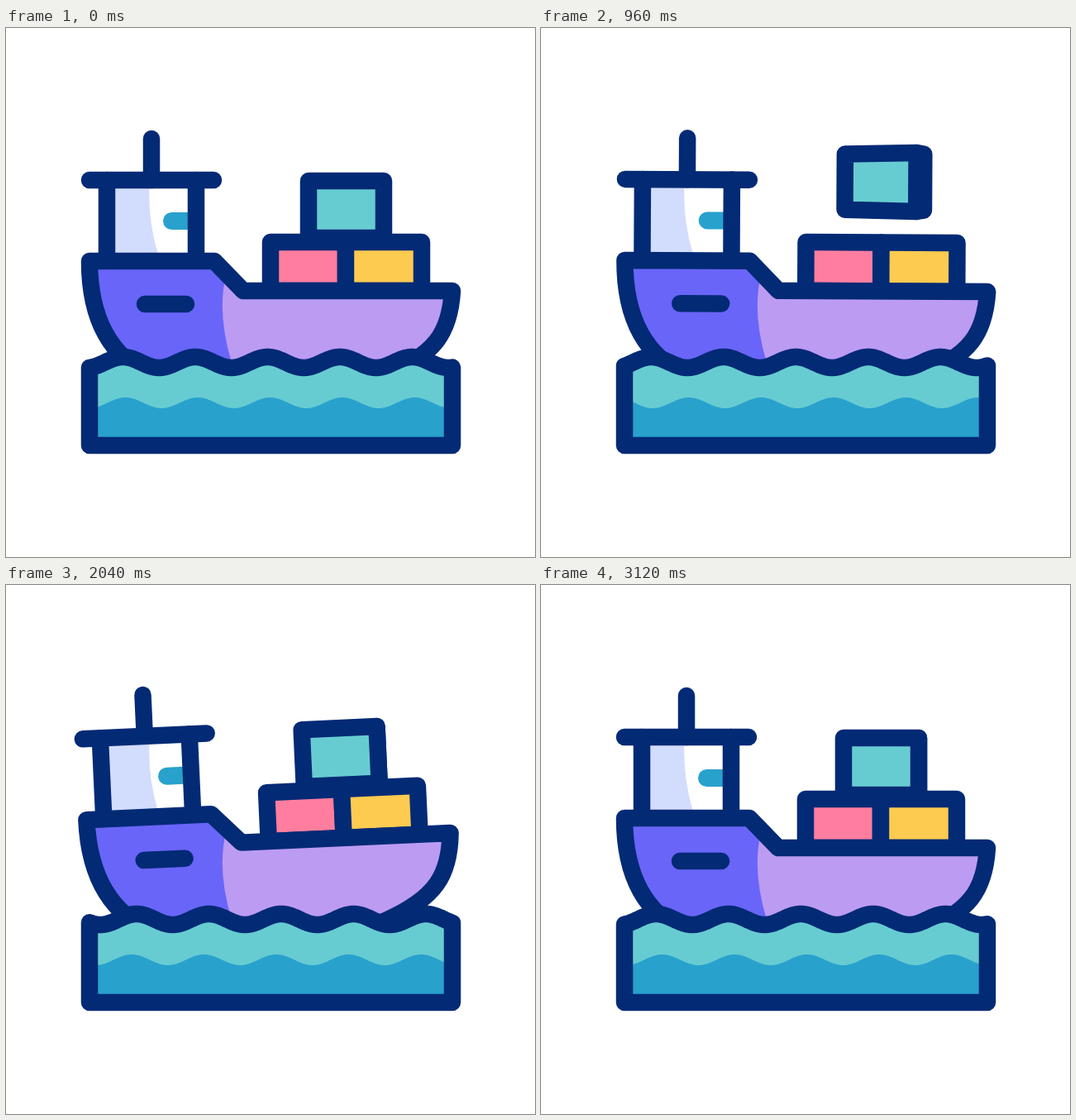
Recreate the animation shown at these times as an HTML page with a canvas. Size 640x640 px, loop 3160 ms.

```html
<!DOCTYPE html>
<html>
<head>
<meta charset="utf-8">
<style>
html, body { margin: 0; width: 100%; height: 100%; overflow: hidden; background: #fff; }
canvas { display: block; width: 640px; height: 640px; }
</style>
</head>
<body>
<canvas id="stage" width="640" height="640"></canvas>
<script>
const LOOP = 3160, STEP = 40, WAVE = 87.5;
const NAVY = '#032a75', TEAL = '#67ccd1', BLUE = '#28a1cd', PURPLE = '#6965f8',
  LAVENDER = '#bc9bf3', PALE = '#d2dcfd', PINK = '#ff7e9f', YELLOW = '#fecb51', ORANGE = '#ff9100';
const c = document.getElementById('stage').getContext('2d');

const rad = a => a * Math.PI / 180;
const mix = (a, b, k) => a + (b - a) * k;
const clamp = v => Math.min(1, Math.max(0, v));

// Soft rise from 0 to 1 and back between two times
const bump = (t, from, to) => Math.sin(Math.PI * clamp((t - from) / (to - from))) ** 2;

// The ship rocks in alternating swings
const tilt = t => 2.9 * bump(t, 260, 1040) - 5 * bump(t, 960, 1360)
  + 2.4 * bump(t, 1320, 1640) - 2.95 * bump(t, 1640, 2300) + .8 * bump(t, 2300, 3000);

// A heave lifts the hull and disturbs both waves
const heave = t => bump(t, 1400, 2360);
const swell = t => 2 * WAVE * t / LOOP + 30 * bump(t, 560, 1600)
  - 12 * heave(t) + 5 * bump(t, 2200, 3080);
const drift = t => 44 * heave(t) - 2 * WAVE * t / LOOP;

function poly(points, fill) {
  const p = new Path2D();
  points.forEach(([x, y]) => p.lineTo(x, y));
  p.closePath();
  c.fillStyle = fill;
  c.fill(p);
  c.stroke(p);
}

function line(x1, y1, x2, y2) {
  c.beginPath();
  c.moveTo(x1, y1);
  c.lineTo(x2, y2);
  c.stroke();
}

const crate = (x, y, w, h, fill) =>
  poly([[x, y], [x + w, y], [x + w, y + h], [x, y + h]], fill);

const hull = new Path2D(`M101 282H252L287 318H540C537 368 520 396 455 421L440 425H200
  L178 422C120 396 101 342 101 282Z`);
const cabin = new Path2D('M122 184H230V282H122Z');
const hullShade = new Path2D('M0 200H270L266 300Q255 345 273 405L280 450H0Z');
const cabinShade = new Path2D('M0 150H178Q166 215 184 274L190 300H0Z');

// Fills a moving shape; its shade stays fixed to the stage
function shaded(shape, base, shade, tint) {
  c.save();
  c.clip(shape);
  c.resetTransform();
  c.fillStyle = base;
  c.fillRect(0, 0, 640, 640);
  c.fillStyle = tint;
  c.fill(shade);
  c.restore();
}

function drawPuff(t) {
  const u = t % (LOOP / 3);
  const size = clamp((u - 30) / 120) * clamp((900 - u) / 160);
  c.fillStyle = ORANGE;
  c.beginPath();
  c.arc(155 + .196 * u, 80 - 6.5e-5 * u * u, 20.5 * size, 0, 7);
  c.fill();
}

function drawTopBox(t) {
  const k = bump(t, 860, 1620);
  const left = mix(-45.5, -60.5, k), mid = mix(45.5, 4, k), right = mix(45.5, 58, k);
  const hl = mix(34.5, 29, k), hm = mix(34.5, 40, k), hr = mix(34.5, 31.5, k);
  c.save();
  c.translate(411.5 + 20 * k, 219.5 - 61 * bump(t, 600, 1950));
  c.rotate(rad(-8.3 * bump(t, 1040, 2000)));
  if (k > 0) poly([[mid, -hm], [right, -hr], [right, hr], [mid, hm]], BLUE);
  poly([[left, -hl], [mid, -hm], [mid, hm], [left, hl]], TEAL);
  c.restore();
}

function drawShip(t) {
  const hop = 8 * bump(t, 1000, 1480);
  c.save();
  c.translate(320, 366 - 10.6 * heave(t));
  c.rotate(rad(tilt(t)));
  c.translate(-320, -366);

  drawTopBox(t);
  crate(320, 259 - hop, 91, 59, PINK);
  crate(411, 259 - 2 * hop, 92, 59, YELLOW);

  shaded(cabin, '#fff', cabinShade, PALE);
  c.fillStyle = BLUE;
  c.beginPath();
  c.roundRect(190, 223, 36, 21, [10.5, 0, 0, 10.5]);
  c.fill();
  line(122, 184, 122, 282);
  line(230, 184, 230, 282);
  line(101, 184, 251, 184);
  line(176, 134, 176, 184);

  shaded(hull, LAVENDER, hullShade, PURPLE);
  c.stroke(hull);
  line(168, 334, 218, 334);
  c.restore();
}

function sea(level, crest) {
  const p = new Path2D();
  for (let x = 101; x <= 540; x++)
    p.lineTo(x, level - 6.5 * Math.cos(2 * Math.PI * (x - crest) / WAVE));
  p.lineTo(540, 505);
  p.lineTo(101, 505);
  p.closePath();
  return p;
}

function drawSea(t) {
  const top = sea(404.5, 229 + swell(t));
  c.fillStyle = TEAL;
  c.fill(top);
  c.fillStyle = BLUE;
  c.fill(sea(453.5, 232 + drift(t)));
  c.stroke(top);
}

function draw(t) {
  c.fillStyle = '#fff';
  c.fillRect(0, 0, 640, 640);
  c.strokeStyle = NAVY;
  c.lineWidth = 20.5;
  c.lineCap = c.lineJoin = 'round';
  drawPuff(t);
  drawShip(t);
  drawSea(t);
}

const start = performance.now();
function tick() {
  const t = (performance.now() - start) % LOOP;
  draw(Math.floor(t / STEP) * STEP);
  requestAnimationFrame(tick);
}
tick();
</script>
</body>
</html>
```
